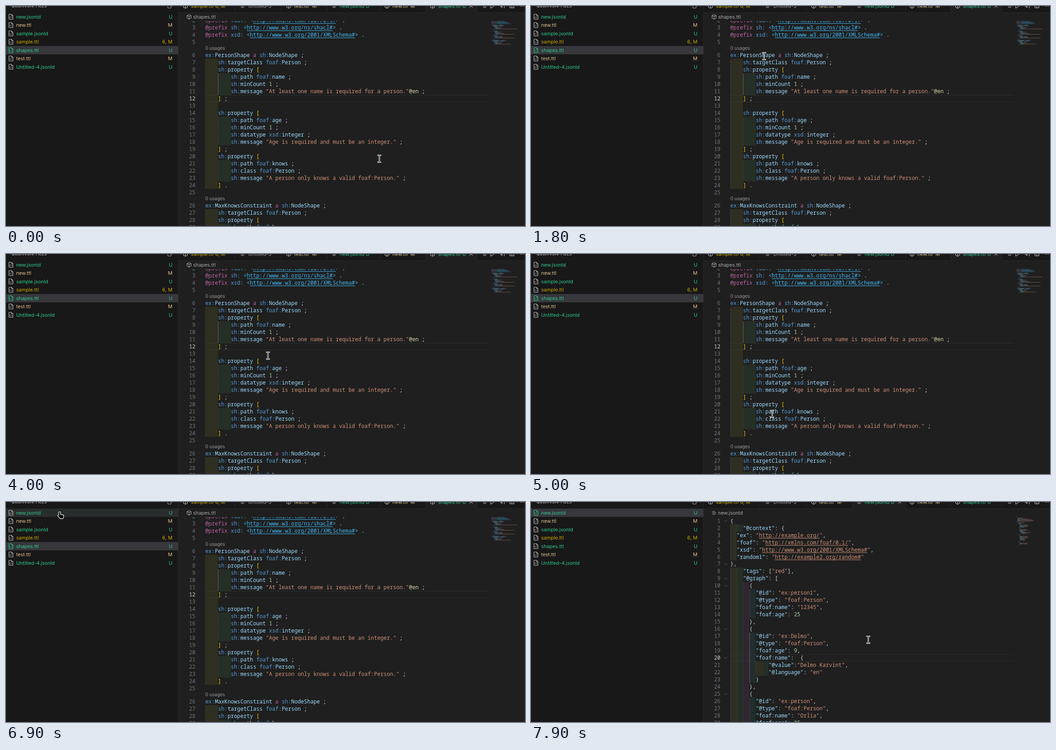
An HTML page with a canvas for the animation above (8000 ms loop, 1151 by 487 pixels).

```html
<!DOCTYPE html>
<html>
<head>
<meta charset="utf-8">
<style>
html, body { margin: 0; width: 100%; height: 100%; overflow: hidden; background: #1f1f1f; }
canvas { display: block; }
</style>
</head>
<body>
<canvas id="stage" width="1151" height="487"></canvas>
<script>
const ctx = document.getElementById('stage').getContext('2d');
const LOOP = 8000, CHAR = 7.06, LINE = 15.966, ROW = 18.48, LEFT = 442;
const MONO = '11.77px "Noto Sans Mono", monospace';
const UI = '10.92px Inter, sans-serif';
const GREEN = '#2fc98c', TAN = '#e2c08d', AMBER = '#cca700', GREY = '#9d9d9d';
const EDGE = '#2b2b2b', BLUE = '#569cd6', SKY = '#9cdcfe', STRING = '#ce9178', PLAIN = '#d4d4d4', PINK = '#c462a4';
const RAINBOW = ['255,255,64', '127,255,127', '255,127,255', '79,236,236'].map(c => `rgba(${c},.07)`);

const shapesDoc = {
  name: 'shapes.ttl', unit: 4, current: 12, guide: [1, 9, 11], lenses: [6, 26], color: turtleColor,
  token: /"[^"]*"|<[^>]*>|@\w+|\w+:|\w+|\S/g,
  y: n => 205 + (n - 12) * LINE + (n < 6 ? -13.4 : n > 25 ? 13.4 : 0),
  lines: `@prefix ex: <http://example.org/> .
@prefix foaf: <http://xmlns.com/foaf/0.1/> .
@prefix sh: <http://www.w3.org/ns/shacl#> .
@prefix xsd: <http://www.w3.org/2001/XMLSchema#> .

ex:PersonShape a sh:NodeShape ;
    sh:targetClass foaf:Person ;
    sh:property [
        sh:path foaf:name ;
        sh:minCount 1 ;
        sh:message "At least one name is required for a person."@en ;
    ] ;
${'    '}
    sh:property [
        sh:path foaf:age ;
        sh:minCount 1 ;
        sh:datatype xsd:integer ;
        sh:message "Age is required and must be an integer." ;
    ] ;
    sh:property [
        sh:path foaf:knows ;
        sh:class foaf:Person ;
        sh:message "A person only knows a valid foaf:Person." ;
    ] .

ex:MaxKnowsConstraint a sh:NodeShape ;
    sh:targetClass foaf:Person ;
    sh:property [
        sh:path foaf:knows ;
        sh:maxCount 5 ;
        sh:message "A person knows at most five." ;
    ] .`.split('\n')
};

const jsonDoc = {
  name: 'new.jsonld', unit: 2, current: 20, guide: [3, 17, 23], lenses: [], color: jsonColor,
  token: /"[^"]*"(?=:)|"[^"]*"|\d+|\S/g,
  y: n => 41.5 + (n - 1) * LINE,
  lines: `{
    "@context": {
  "ex": "http://example.org/",
  "foaf": "http://xmlns.com/foaf/0.1/",
  "xsd": "http://www.w3.org/2001/XMLSchema#",
  "random1": "http://example2.org/random#"
},
    "tags": ["red"],
    "@graph": [
      {
        "@id": "ex:person1",
        "@type": "foaf:Person",
        "foaf:name": "12345",
        "foaf:age": 25
      },
      {
        "@id": "ex:Delmo",
        "@type": "foaf:Person",
        "foaf:age": 9,
        "foaf:name":  {
            "@value":"Delmo Karvint",
            "@language": "en"
        }
      },
      {
        "@id": "ex:person",
        "@type": "foaf:Person",
        "foaf:name": "Orlia",
        "foaf:age": 25,
        "foaf:knows": [
          "ex:person1"
        ]
      },
      {
        "@id": "ex:person2",
        "@type": "foaf:Person"
      }
    ]
}`.split('\n')
};

const files = [
  ['new.jsonld', 'U', GREEN], ['new.ttl', 'M', TAN], ['sample.jsonld', 'U', GREEN], ['sample.ttl', '6, M', AMBER],
  ['shapes.ttl', 'U', GREEN], ['test.ttl', 'M', TAN], ['Untitled-4.jsonld', 'U', GREEN]
];
// name, tab edge, label x, badge, badge x, colour
const tabs = [
  ['sample.ttl', 383, 410, '6, M', 464, AMBER], ['Untitled-3', 508, 537, '', 0, GREY],
  ['test.ttl', 611, 639, 'M', 679, TAN], ['new.jsonld', 713, 740, 'U', 798, GREEN],
  ['new.ttl', 831, 857, 'M', 897, TAN], ['shapes.ttl', 931, 958, 'U', 1012, GREEN]
];
// time, x, y
const path = [
  [0, 828, 338], [100, 828, 338], [600, 673, 162], [800, 673, 162], [1100, 560, 110], [1300, 502, 95],
  [1600, 530, 115], [1800, 517, 111], [2600, 555, 154], [2900, 576, 165], [3100, 599, 172], [3500, 521, 189],
  [4000, 581, 225], [4400, 521, 261], [4700, 595, 325], [4900, 555, 360], [5000, 535, 354], [5200, 511, 335],
  [5300, 526, 314], [5400, 495, 279], [5600, 495, 279], [5800, 270, 160], [5900, 190, 115], [6000, 190, 115],
  [6200, 151, 61], [6600, 119, 23], [7100, 119, 23], [7300, 250, 60], [7600, 690, 280], [7800, 748, 305], [LOOP, 748, 305]
];
const cursors = {
  beam: new Path2D('M-3-7.5Q0-7.5 0-6Q0-7.5 3-7.5M0-6V6M-3 7.5Q0 7.5 0 6Q0 7.5 3 7.5'),
  hand: new Path2D('M-1.3 7V.5a1.3 1.3 0 0 1 2.6 0V5l5 1q2 .5 2 2.5v1q0 3-1.6 3.8H1.5Q0 12-1 10.5L-3.6 7.2q.5-1.8 2.3-.2z'),
  arrow: new Path2D('M0 0V12L3 9.5 5 13.5 7 12.5 5 9H9z')
};

function turtleColor(s) {
  if (s[0] === '"') return STRING;
  if (s[0] === '<') return '#3fb8f5';
  if (s === '@prefix' || s === 'a') return PINK;
  if (s[0] === '@') return '#dcdcaa';
  if (/^\w+:$/.test(s)) return BLUE;
  if (/^\d/.test(s)) return '#b5cea8';
  if (/[[\]]/.test(s)) return '#ffd700';
  return /\w/.test(s) ? SKY : PLAIN;
}
function jsonColor(s, next) {
  if (s[0] === '"') return next === ':' ? SKY : STRING;
  return /\d/.test(s) ? '#b5cea8' : PLAIN;
}

function rect(x, y, w, h, color) {
  ctx.fillStyle = color;
  ctx.fillRect(x, y, w, h);
}
function text(s, x, y, color, font = UI, align = 'left') {
  ctx.font = font;
  ctx.textAlign = align;
  ctx.fillStyle = color;
  ctx.fillText(s, x, y);
}
function stroke(d, x, y, color, width = 1) {
  ctx.save();
  ctx.translate(x, y);
  ctx.strokeStyle = color;
  ctx.lineWidth = width;
  ctx.stroke(d instanceof Path2D ? d : new Path2D(d));
  ctx.restore();
}
function typeIcon(name, x, y, color) {
  stroke(name.endsWith('.ttl') ? 'M0-5L4.5-2.8V2.8L0 5-4.5 2.8V-2.8zM-4.5-2.8L0-.5 4.5-2.8M0-.5V5'
    : 'M-4-3H2M-4 0H4.5M-4 3H3', x, y, color);
}

function drawCode(doc, t, rainbow) {
  doc.lines.forEach((line, i) => {
    const n = i + 1, y = doc.y(n), top = y - LINE / 2;
    const indent = line.match(/^ */)[0].length, step = doc.unit * CHAR;
    if (n === doc.current) {
      rect(LEFT, top, 628, 1, '#2c2c2c');
      rect(LEFT, top + LINE - 1, 628, 1, '#2c2c2c');
    }
    for (let k = 0; k < indent / doc.unit; k++) {
      const [level, from, to] = doc.guide;
      if (rainbow) rect(LEFT + k * step, top, step, LINE, RAINBOW[k % 4]);
      rect(LEFT + k * step, top, 0.85, LINE, k === level && n >= from && n <= to ? '#707070' : '#3a3a3a');
    }
    text(n, 420, y + 4.2, n === doc.current ? '#cccccc' : '#6e7681', MONO, 'right');
    if (doc.lenses.includes(n)) text('0 usages', LEFT, y - 11.8, '#999999', '10.08px Inter, sans-serif');
    for (const m of line.matchAll(doc.token)) {
      const x = LEFT + m.index * CHAR, color = doc.color(m[0], line[m.index + m[0].length]);
      text(m[0], x, y + 4.2, color, MONO);
      const url = m[0].match(/http[^">]*/);
      if (url) rect(x + CHAR, y + 6.2, url[0].length * CHAR, 1, color);
      ctx.globalAlpha = 0.45;
      rect(1077 + m.index * 0.84, 33.5 + i * 1.68, m[0].length * 0.84, 1, color);
      ctx.globalAlpha = 1;
    }
  });
  if (doc !== jsonDoc) return;
  if (t < 7500) rect(603, doc.y(20) - 7.5, 1.5, 15, '#cccccc');
  ctx.globalAlpha = t < 7800 ? 0 : t < 7900 ? 0.5 : 1;
  for (const n of [1, 7, 9, 10, 16, 20, 25]) stroke('M-3.5-1.5L0 2 3.5-1.5', 432, doc.y(n), '#555555');
  ctx.globalAlpha = 1;
}

function drawHeader(doc) {
  rect(383, 0, 768, 33.2, '#1f1f1f');
  rect(383, 0, 768, 14.7, '#181818');
  rect(383, 14, 768, 0.8, EDGE);
  tabs.forEach(([name, x, labelX, badge, badgeX, color], i) => {
    const end = i < 5 ? tabs[i + 1][1] : 1045, active = name === doc.name;
    if (active) rect(x, 0, end - x, 15, '#1f1f1f');
    rect(end - 1, 0, 0.85, 14.7, EDGE);
    typeIcon(name, labelX - 12, 0, '#cccccc');
    text(name, labelX, 3.6, color);
    text(badge, badgeX, 3.6, color);
    if (active) stroke('M-3.5-3.5L3.5 3.5M3.5-3.5L-3.5 3.5', end - 13.5, 0, '#dddddd');
  });
  typeIcon('', 1062, 0, '#cccccc');
  stroke('M-3-5L4.5 0-3 5z', 1078, 0, '#cccccc');
  stroke('M-4-4V2H0M4 5V-2H0M-2 0L0 2-2 4', 1101, 0, '#cccccc');
  stroke('M-4.5-4H4.5V4H-4.5zM0-4V4', 1122, 0, '#cccccc');
  for (const x of [1140, 1143.5, 1147]) rect(x, -0.5, 1.5, 1.5, '#cccccc');
  typeIcon(doc.name, 406, 24, '#b0b0b0');
  text(doc.name, 415, 27.8, '#a9a9a9');
}

function drawSidebar(doc, hovered) {
  rect(0, 0, 382, 487, '#181818');
  rect(382, 0, 0.9, 487, EDGE);
  text('QUBRIVON: FILES', 12, 3.3, '#cccccc', '9.24px Inter, sans-serif');
  stroke('M-4-3H3V4H-4zM-1-5H5V1', 363, 0.5, '#a0a0a0');
  files.forEach(([name, badge, color], i) => {
    const y = 23.8 + i * ROW, selected = name === doc.name;
    if (selected) rect(0, y - ROW / 2, 382, ROW, '#37373d');
    else if (i === hovered) rect(0, y - ROW / 2, 382, ROW, '#2a2d2e');
    stroke('M-4.5-5.5H1.5L4.5-2.5V5.5H-4.5zM1.5-5.5V-2.5H4.5M-1-.5L-2.7 1.3-1 3M1-.5L2.7 1.3 1 3',
      11, y, selected ? GREEN : '#c5c5c5');
    text(name, 22.5, y + 4, color);
    text(badge, 369, y + 4, color, UI, 'right');
  });
}

function pointerAt(t) {
  const i = path.findIndex(p => p[0] > t), [t0, x0, y0] = path[i - 1], [t1, x1, y1] = path[i];
  const k = (t - t0) / (t1 - t0);
  return [x0 + (x1 - x0) * k, y0 + (y1 - y0) * k];
}

function drawPointer(x, y, kind) {
  ctx.lineJoin = ctx.lineCap = 'round';
  stroke(cursors[kind], x, y, '#ffffff', kind === 'beam' ? 2.8 : 2.4);
  if (kind === 'beam') stroke(cursors.beam, x, y, '#000000', 0.9);
  else {
    ctx.save();
    ctx.translate(x, y);
    ctx.fillStyle = '#000000';
    ctx.fill(cursors[kind]);
    ctx.restore();
  }
  ctx.lineJoin = 'miter';
  ctx.lineCap = 'butt';
}

function frame(now) {
  const t = Math.floor(now % LOOP / 100) * 100;
  const doc = t < 7000 ? shapesDoc : jsonDoc;
  const [x, y] = pointerAt(t);
  const row = Math.floor((y - 14.56) / ROW);
  const inSidebar = x < 382, onFile = inSidebar && row >= 0 && row < files.length;
  rect(0, 0, 1151, 487, '#1f1f1f');
  drawCode(doc, t, doc === shapesDoc || t >= 7200);
  drawHeader(doc);
  drawSidebar(doc, onFile ? row : -1);
  drawPointer(x, y, onFile ? 'hand' : inSidebar ? 'arrow' : 'beam');
  requestAnimationFrame(frame);
}
requestAnimationFrame(frame);
</script>
</body>
</html>
```
